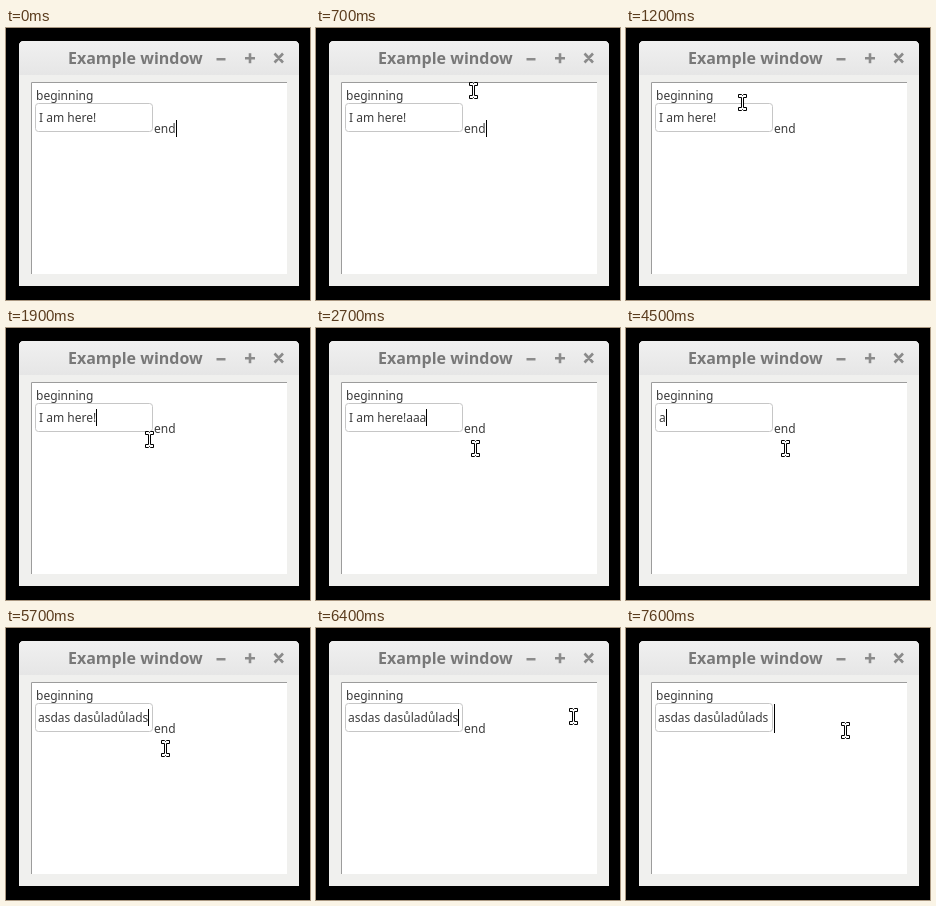
Recreate the animation shown at these times as an HTML page. Size 304x272 px, loop 8 s.

```html
<!DOCTYPE html>
<html lang="en">
<head>
<meta charset="utf-8">
<title>Example window</title>
<style>
  html, body { margin: 0; width: 100%; height: 100%; overflow: hidden; background: #000; }
  svg { display: block; width: 304px; height: 272px; }
  text { font: 12px "Noto Sans", sans-serif; fill: #3c3c3c; white-space: pre; }
  .title { font-size: 16px; font-weight: 700; fill: #787878; }
  .buttons { fill: none; stroke: #8b8b8b; stroke-width: 2.6; }
</style>
</head>
<body>
<svg viewBox="0 0 304 272">
  <defs>
    <linearGradient id="bar" x2="0" y2="1">
      <stop stop-color="#f0f0f0"/>
      <stop offset="1" stop-color="#e6e6e6"/>
    </linearGradient>
  </defs>

  <path d="M13 258V18q0-5 5-5H288q5 0 5 5V258z" fill="#f0f0ee"/>
  <path d="M13 47V18q0-5 5-5H288q5 0 5 5V47z" fill="url(#bar)"/>
  <text class="title" x="62" y="36">Example window</text>
  <path class="buttons" d="M210.5 31.3h9M239 30.3h10M244 25.3v10M268.5 25.5l8.5 9M277 25.5l-8.5 9"/>

  <rect x="25" y="54" width="256" height="192" fill="#fff"/>
  <path d="M25.5 246V54.5H281" fill="none" stroke="#9c9c9c"/>
  <text x="30" y="72">beginning</text>
  <text id="tail" x="148" y="105"></text>

  <rect x="29.5" y="75.5" width="117" height="28" rx="3" fill="#fff" stroke="#c6c6c6"/>
  <text id="entry" y="94"></text>

  <rect id="caret" width="1"/>
  <path id="mouse" d="M-4 -8H-1L0 -7L1 -8H4V-5H1V5H4V8H1L0 7L-1 8H-4V5H-1V-5H-4z"
        fill="#fff" stroke="#000"/>
</svg>
<script>
const LOOP = 8000;
const $ = id => document.getElementById(id);
const set = (el, attrs) => Object.entries(attrs).forEach(([k, v]) => el.setAttribute(k, v));

// Time, entry text, caret x (0 hides it)
const typing = [
  [0, "I am here!", 0], [1600, "I am here!", 90], [2400, "I am here!", 0],
  [2500, "I am here!a", 97], [2600, "I am here!aa", 103], [2700, "I am here!aaa", 110],
  [3400, "I am here!", 90], [3900, "I am here", 87], [4100, "I am he", 75],
  [4200, "I ", 40], [4400, "", 33], [4500, "a", 40],
  [4700, "as", 45], [4800, "asda", 59], [4900, "asdas ", 68],
  [5100, "asdas das", 88], [5300, "asdas dasů", 95], [5400, "asdas dasůla", 105],
  [5500, "asdas dasůladůl", 123], [5700, "asdas dasůladůlads", 142],
  [6700, "asdas dasůladůlads", 0]
];

// Time, text after the entry, caret x, caret top, caret height
const ending = [
  [0, "end", 170, 92, 17], [1200, "end", 0], [6700, "end", 170, 92, 17],
  [7100, "end", 0], [7400, "e", 155, 92, 17], [7600, "", 148, 76, 29]
];

// Pointer moves: start, steps, from, to, easing power; sampled every 100 ms
const moves = [
  [400, 9, 199.5, 50.5, 116.5, 74.5, 1.5],
  [1300, 2, 112.5, 83.5, 108.5, 91.5, 1],
  [1700, 5, 115.5, 95.5, 158.5, 120.5, 1.5],
  [2400, 1, 159.5, 120.5, 159.5, 120.5, 1],
  [6100, 3, 176.5, 114.5, 288.5, 78.5, 1],
  [6400, 3, 257.5, 88.5, 219.5, 102.5, 1.5]
];

const at = (list, t) => list.findLast(row => row[0] <= t);

function pointer(t) {
  const move = at(moves, t);
  if (!move) return null;
  const [start, steps, x0, y0, x1, y1, power] = move;
  const step = Math.min(steps - 1, Math.floor((t - start) / 100));
  const p = steps > 1 ? 1 - (1 - step / (steps - 1)) ** power : 1;
  const mix = (a, b) => Math.floor(a + (b - a) * p) + 0.5;
  return [mix(x0, x1), mix(y0, y1)];
}

function draw(t) {
  const [, text, entryX] = at(typing, t);
  const [, tail, tailX, top, height] = at(ending, t);
  const pos = pointer(t);

  $("entry").textContent = text;
  $("entry").setAttribute("x", text.length > 17 ? 32 : 33);
  $("tail").textContent = tail;

  if (entryX) set($("caret"), { x: entryX, y: 81, height: 17 });
  else set($("caret"), { x: tailX, y: top || 92, height: tailX ? height : 0 });

  $("mouse").style.display = pos ? "" : "none";
  if (pos) $("mouse").setAttribute("transform", `translate(${pos})`);
}

const origin = performance.now();
(function tick() {
  draw((performance.now() - origin) % LOOP);
  requestAnimationFrame(tick);
})();
</script>
</body>
</html>
```
